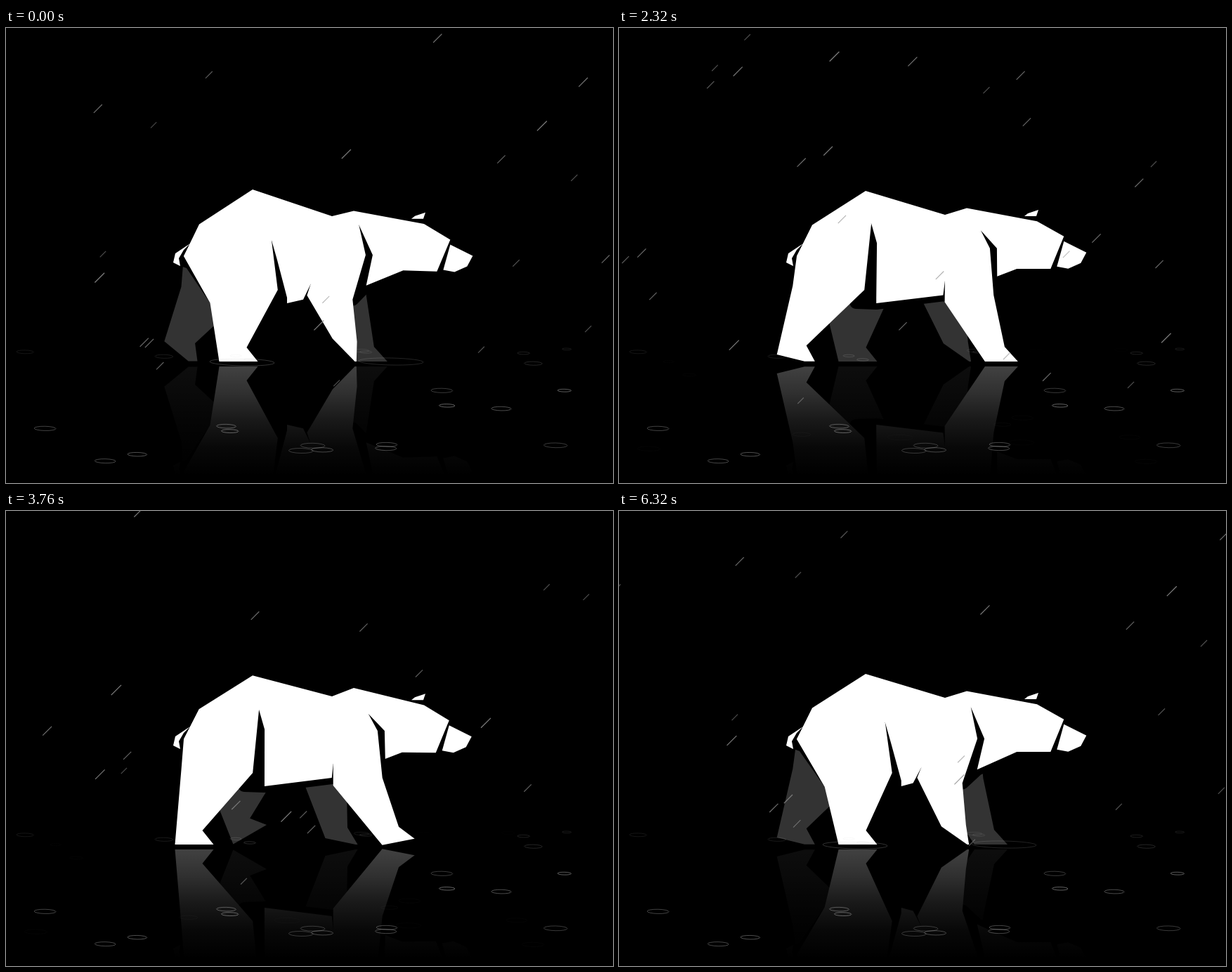
Write an HTML page with a canvas that moves like this. It is 864 px wide and 648 px high and loops after 6400 ms.

```html
<!DOCTYPE html>
<html>
<head>
<meta charset="utf-8">
<title>Bear in the rain</title>
<style>
html, body { margin: 0; height: 100%; background: #000; overflow: hidden; }
canvas { display: block; }
</style>
</head>
<body>
<canvas id="stage" width="864" height="648"></canvas>
<script>
const ctx = document.getElementById('stage').getContext('2d');
const STEP = 80, STEPS = 80, WALK = 20, TAU = 2 * Math.PI;

// Rigid feet: size in pixels, and [walk step, pitch in degrees, toe x, toe y]
// at lift-off, push, swing, reach and landing. Stance is the way back to lift-off.
const HIND_FOOT = {
  length: 55, pad: 15, ankle: [-16, -20],
  path: [[8.5, 0, 282, 475], [11.5, 62, 263, 474], [15, 37, 313, 474], [17, -30, 371, 447], [18.5, 0, 372, 475]]
};
const FORE_FOOT = {
  length: 47, pad: 3, ankle: [-19, -21],
  path: [[16, 0, 504, 475], [19.6, 40, 497, 475], [22, 62, 508, 475], [25, -33, 591, 450], [28, 0, 577, 475]]
};

const mod = (a, n) => ((a % n) + n) % n;
const clamp = v => Math.min(1, Math.max(0, v));
const rnd = n => mod(Math.sin(n * 127.1 + 11.7) * 43758.5453, 1);
const wave = (t, peak, period) => Math.cos((t - peak) * TAU / period);

function poly(points, color) {
  ctx.beginPath();
  points.forEach(p => ctx.lineTo(p[0], p[1]));
  ctx.closePath();
  ctx.fillStyle = color;
  ctx.fill();
}

// Heel, sole, toe and ankle at a step of the walk
function foot({ length, pad, ankle, path }, step) {
  const first = path[0][0], t = first + mod(step - first, WALK);
  const stops = [...path, [first + WALK, ...path[0].slice(1)]];
  const i = stops.findIndex(s => s[0] > t);
  const a = stops[i - 1], b = stops[i], u = (t - a[0]) / (b[0] - a[0]);
  const [, pitch, x, y] = a.map((v, k) => v + (b[k] - v) * u);
  const c = Math.cos(pitch * TAU / 360), s = Math.sin(pitch * TAU / 360);
  const turn = (dx, dy) => [x + dx * c - dy * s, y + dx * s + dy * c];
  return [turn(-length, 0), [x - pad * c, y + pad * Math.max(0, -s)], [x, y], turn(...ankle)];
}

function hips(step) {
  const w = wave(step, 18.5, WALK);
  return {
    back: [270 + 23 * w, 380 + 13 * w],
    thigh: [369 + 20 * w, 373],
    tip: [369 + 10 * w, 290 + 12 * wave(step, 0, WALK)],
    belly: [384 + 18 * w, 392]
  };
}

function shoulders(step) {
  const w = wave(step, 7.5, WALK);
  return {
    rear: [444 + 22 * w, 385 + 6 * w],
    tip: [447 + 19 * w, 363 - 3 * w],
    belly: [440 + 24 * w, 384 - 4 * w],
    front: [511 + 25 * w, 384 - 4 * w],
    pit: [519 + 10 * w, 319 - 6 * w],
    crease: [508 + 8 * w, 284 + 5 * w],
    throat: [524 + 16 * w, 361 - 8 * w]
  };
}

function hindLeg(step, color) {
  const { back, thigh, tip } = hips(step);
  poly([[275, 282], [253, 325], back, ...foot(HIND_FOOT, step), thigh, tip], color);
}

function foreLeg(step, color) {
  const { rear, tip, front, pit, crease } = shoulders(step);
  poly([[450, 300], tip, rear, ...foot(FORE_FOOT, step), front, pit, crease], color);
}

function bear(step) {
  const far = step + WALK / 2;
  hindLeg(far, '#333');
  ctx.save();
  ctx.translate(10 * wave(far, 0.5, WALK) - 6, 0);
  foreLeg(far, '#333');
  ctx.restore();

  const hip = hips(step), arm = shoulders(step);
  const bob = wave(step, 2, WALK / 2);
  const nod = 3 + 10.5 * wave(step, 3.2, WALK / 2);
  const reach = -2.7 - 4 * wave(step, 3.9, WALK / 2);
  const head = (x, y, sway = 1) => [x + reach, y + nod * sway];
  const jaw = head(565, 346, 0.5);

  // Dark gap between the body and the far legs
  poly([hip.tip, hip.thigh, [hip.thigh[0] - 12, 391], hip.belly, arm.belly,
    arm.front, arm.throat, jaw, arm.crease], '#000');
  ctx.lineWidth = 18;
  ctx.lineJoin = 'round';
  ctx.strokeStyle = '#000';
  ctx.stroke();
  poly([[253, 325], hip.back, [257, 342], [246, 338]], '#000');

  poly([[253, 325], [275, 280 - 2 * bob], [351, 231 - 3.3 * bob], [464, 267 + 3 * bob],
    [495, 258.5 + 6.5 * bob], [595, 280 + nod * 0.75], head(632, 303), head(613, 348, 0.8), jaw,
    arm.throat, [arm.pit[0] + 10, arm.pit[1]], arm.crease, arm.tip, arm.belly,
    hip.belly, [hip.belly[0], 384], [hip.tip[0] + 8, hip.tip[1] + 28], hip.tip], '#fff');
  hindLeg(step, '#fff');
  foreLeg(step, '#fff');
  poly([head(632, 310), head(664, 326), head(656, 341), head(638, 349), head(622, 346)], '#fff');
  const ear = nod * 0.8;
  poly([[577, 273 + ear], [582, 269 + ear], [597, 264 + ear], [594, 273 + ear]], '#fff');
  poly([[262, 307], [241, 321], [238, 334], [248, 339], [246, 328], [253, 316]], '#fff');
}

function reflection(step) {
  ctx.save();
  ctx.transform(1, 0, 0, -1, 0, 957);
  bear(step);
  ctx.restore();
  const fade = ctx.createLinearGradient(0, 480, 0, 636);
  [0.74, 0.81, 0.9, 0.97, 1].forEach((a, i) => fade.addColorStop(i / 4, `rgba(0,0,0,${a})`));
  ctx.fillStyle = fade;
  ctx.fillRect(0, 477, 864, 171);
}

function ring(x, y, width, alpha) {
  ctx.strokeStyle = `rgba(215,215,215,${Math.max(0, alpha)})`;
  ctx.lineWidth = 1;
  ctx.beginPath();
  ctx.ellipse(x, y, width / 2, Math.min(5, width * 0.1), 0.02, 0, TAU);
  ctx.stroke();
}

// A third of the ripples stays; the others take turns three times per loop
function ripples(step) {
  const turn = wave(step, -2, STEPS / 3);
  const levels = [1, clamp(0.6 + turn), clamp(0.6 - turn)];
  for (let i = 0; i < 36; i++) {
    const y = 452 + 180 * Math.pow(rnd(i + 500), 1.2);
    const width = 11 + (y - 450) * 0.1 + 14 * rnd(i + 700);
    ring(840 * rnd(i + 600), y, width, levels[i % 3] * (0.8 - width * 0.016) * clamp((y - 440) / 90));
  }
  const splash = 0.25 * wave(step, 5, STEPS);
  ring(336, 476, 92, splash);
  ring(548, 475, 92, splash * 0.7);
}

function rain(step) {
  for (let i = 0; i < 36; i++) {
    const falls = 4 + i % 3;
    const p = step / STEPS * falls + rnd(i);
    const seed = i * 17 + Math.floor(p) % falls;
    const land = 450 + 190 * rnd(seed + 300);
    const y = -20 + (land + 20) * (p % 1);
    const x = -520 + 1384 * rnd(seed + 900) + (land - y) * 0.95;
    const size = 8 + 7 * rnd(i + 50);
    ctx.strokeStyle = `rgba(145,145,145,${size / 16})`;
    ctx.lineWidth = 1.2;
    ctx.beginPath();
    ctx.moveTo(x, y);
    ctx.lineTo(x + size, y - size);
    ctx.stroke();
  }
}

function draw(now) {
  const step = Math.floor(now / STEP) % STEPS;
  ctx.fillStyle = '#000';
  ctx.fillRect(0, 0, 864, 648);
  reflection(step);
  bear(step);
  ripples(step);
  rain(step);
}

const start = performance.now();
function tick() {
  draw(performance.now() - start);
  requestAnimationFrame(tick);
}
tick();
</script>
</body>
</html>
```
